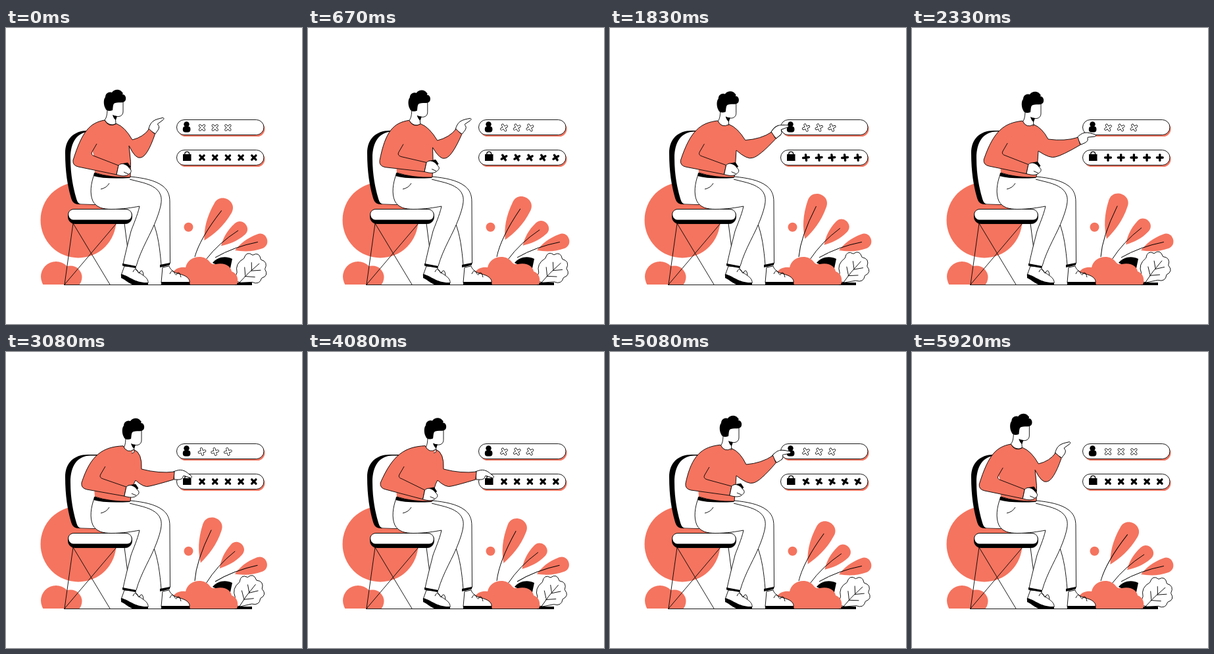
An HTML page with a canvas that plays this animation: 450 px wide and 450 px high, repeating every 6010 ms.

```html
<!DOCTYPE html>
<html lang="en">
<head>
<meta charset="utf-8">
<title>Login illustration</title>
<style>
html, body { margin: 0; width: 100%; height: 100%; overflow: hidden; background: #fff; }
canvas { display: block; width: 450px; height: 450px; }
</style>
</head>
<body>
<canvas id="stage" width="450" height="450"></canvas>
<script>
const ctx = document.getElementById('stage').getContext('2d');
const CORAL = '#f4745f', BLACK = '#000', WHITE = '#fff';
const LINE = 0.9;
const LOOP = 6010;
const TIMES = [0, 1330, 2330, 3080, 4080, 5080, LOOP];
const RAD = Math.PI / 180;

// One value per key time; the last key wraps to the first.
const KEYS = {
  headX: [0, 10, 18, 28, 28, 18],
  headY: [0, 2, 3, 7, 6.5, 3],
  elbowX: [102, 106, 107.5, 108, 110, 108],
  elbowY: [201, 202, 200, 199, 199, 200],
  palmX: [178, 184, 182, 182, 184.5, 184],
  palmY: [216, 216, 216, 218, 217, 217],
  cuffX: [222, 241, 254, 255.5, 255.5, 250],
  cuffY: [157.5, 158.5, 172, 188, 188, 163],
  wrist: [-48, -41, -18, 6, 6, -22],
  crookX: [192, 203, 207, 206, 206, 207],
  crookY: [170, 172, 169, 178, 178, 171],
  bendX: [209, 218, 222, 222, 222, 222],
  bendY: [200, 202, 199, 207, 207, 202],
  pitX: [187, 192, 192, 197, 197, 192],
  pitY: [179, 185, 187, 195, 195, 188],
  leafA: [-60, -69, -72, -72, -69, -62],
  leafB: [-42, -45, -47, -48, -46, -43.5],
  leafC: [-20, -20, -20, -21, -21, -20],
  shrub: [4, 0, -5, -6, -4, 2],
  spinA: [45, 78, 60, 76, 60, 60],
  spinB: [45, 72, 90, 45, 45, 32]
};

// Monotone cubic through the keys, periodic in time.
function sample(v, t) {
  const n = v.length;
  const span = i => TIMES[(i + n) % n + 1] - TIMES[(i + n) % n];
  const slope = i => (v[(i + 1 + n) % n] - v[(i + n) % n]) / span(i);
  const tangent = i => {
    const a = slope(i - 1), b = slope(i);
    return a * b <= 0 ? 0 : 2 * a * b / (a + b);
  };
  let i = 0;
  while (i < n - 1 && t >= TIMES[i + 1]) i++;
  const h = span(i), u = (t - TIMES[i]) / h, w = 1 - u;
  return v[i] * (1 + 2 * u) * w * w + v[(i + 1) % n] * u * u * (3 - 2 * u)
    + h * u * w * (tangent(i) * w - tangent(i + 1) * u);
}

function pose(t) {
  const p = {};
  for (const k in KEYS) p[k] = sample(KEYS[k], t);
  const swing = (1 - Math.cos(t / LOOP * 6 * Math.PI)) / 2;
  p.elbowX += 7 * swing;
  p.palmX += 8 * swing;
  p.palmY -= 6 * swing;
  return p;
}

function shape(d, fill, stroke = BLACK, width = LINE) {
  const path = new Path2D(d);
  if (fill) { ctx.fillStyle = fill; ctx.fill(path); }
  if (stroke) { ctx.strokeStyle = stroke; ctx.lineWidth = width; ctx.stroke(path); }
}

function disc(x, y, r, fill) {
  ctx.beginPath();
  ctx.arc(x, y, r, 0, 7);
  ctx.fillStyle = fill;
  ctx.fill();
}

function pill(x, y, w, h, r, fill, stroke) {
  ctx.beginPath();
  ctx.roundRect(x, y, w, h, r);
  ctx.fillStyle = fill;
  ctx.fill();
  if (stroke) { ctx.strokeStyle = stroke; ctx.lineWidth = LINE; ctx.stroke(); }
}

function at(x, y, degrees, draw) {
  ctx.save();
  ctx.translate(x, y);
  ctx.rotate(degrees * RAD);
  draw();
  ctx.restore();
}

function backdrop() {
  disc(110, 292, 57.5, CORAL);
  ctx.save();
  ctx.beginPath();
  ctx.rect(0, 340, 200, 50);
  ctx.clip();
  disc(76, 378, 23, CORAL);
  disc(98, 379, 17.5, CORAL);
  ctx.restore();
  disc(277.5, 302.8, 7, CORAL);
}

function chair() {
  shape('M102 297L89 390M168 297L89 390M102 297L158 390M180 297L192 390');
  shape('M127 156C104 155 90 168 90 190C90 220 94 240 98 255C100 263 102 267 109 268L140 269H150V156Z', BLACK, null);
  shape('M128 157.5C109 158 98 172 98 198C98 225 103 245 106 256C108 263 109 267 114 267.5L150 268.5V157.5Z', WHITE, null);
  pill(94.5, 275.5, 97, 22, 10, BLACK, BLACK);
  shape('M104 275.5H182C194 275.5 194 292 184 292H102C93 291 91 275.5 104 275.5Z', WHITE);
}

function leaf(x, y, angle, start, length, half) {
  at(x, y, angle, () => {
    const d = length - start, shoulder = length - half;
    shape(`M${start} 0C${start + d * 0.2} ${-half * 0.6} ${start + d * 0.45} ${-half} ${shoulder} ${-half}
      C${length + half * 0.3} ${-half} ${length + half * 0.3} ${half} ${shoulder} ${half}
      C${start + d * 0.45} ${half} ${start + d * 0.2} ${half * 0.5} ${start} 0Z`, CORAL, null);
    shape(`M0 0Q${start} ${-half * 0.5} ${length - half * 1.3} 0`);
  });
}

function shrub(tilt) {
  const nodes = [[357, 387], [350, 372], [359, 350], [372, 344], [385, 350], [392, 364], [388, 378], [374, 385]];
  at(355, 388, tilt, () => {
    ctx.translate(-355, -388);
    let d = 'M' + nodes[0];
    nodes.slice(1).forEach(([x, y], i) => {
      const mx = (x + nodes[i][0]) / 2, my = (y + nodes[i][1]) / 2;
      d += `Q${mx + (mx - 372) * 0.5} ${my + (my - 366) * 0.5} ${x} ${y}`;
    });
    shape(d + 'Z', WHITE);
    shape('M354 388Q366 372 383 356M363 376L361 363M372 367L371 355M362 377L378 377M371 368L386 366');
  });
}

function plants(p) {
  shape('M88 390.5H374');
  leaf(287, 348, p.leafA, 29, 101, 15);
  leaf(304, 352, p.leafB, 31, 81, 11.5);
  leaf(318, 349, p.leafC, 32, 84, 11.5);
  shape('M314 357C321 348 334 346 344 351L340 370Z', BLACK, null);
  shrub(p.shrub);
  shape('M348 387H374V391H348Z', BLACK, null);
  shape('M238 390C237 378 245 371 254 372C258 364 267 363 273 364C277 346 301 343 310 356C313 360 316 359 319 359C334 356 342 363 343 370C352 373 354 383 351 390Z', CORAL, null);
}

function cross(x, y, angle, outlined) {
  at(x, y, angle, () => {
    ctx.lineCap = 'round';
    const bars = 'M-4.4 0H4.4M0 -4.4V4.4';
    shape(bars, null, BLACK, outlined ? 4 : 3.4);
    if (outlined) shape(bars, null, WHITE, 2.5);
    ctx.lineCap = 'butt';
  });
}

function fields(p) {
  for (const y of [139.5, 185.5]) {
    pill(261.5, y + 2.5, 132, 23, 11.5, CORAL);
    pill(259.5, y, 132.5, 23, 11.5, WHITE, BLACK);
  }
  disc(274.5, 146.5, 4.2, BLACK);
  pill(268.8, 149.5, 11.6, 9, 4, BLACK);
  shape('M269 191.8H281.5V202H269Z', BLACK, null);
  shape('M271.8 193V191.5A3.4 3.4 0 0 1 278.6 191.5V193', null, BLACK, 1.3);
  for (let i = 0; i < 5; i++) {
    const x = 298 + i * 19.7;
    if (i < 3) cross(x, 151.5, p.spinA, true);
    cross(x, 197, p.spinB, false);
  }
}

function legs() {
  // far leg
  shape('M180 226L190 226C208 228 226 231 238 240C246 246 249 254 249 264L249.5 358L236 361C234 335 231 314 224 296L205 262Z', WHITE);
  shape('M238 364L236 387H279C280 380 272 376 264 374C256 372 250 368 248 362Z', WHITE);
  shape('M234 360L249 357V360.5L234 364Z', BLACK, null);
  shape('M236 386H279L280 391H236Z', BLACK, null);
  shape('M249 374Q252 366 256 372Q259 378 260 373Q264 369 266 379');
  // near leg
  const shin = 'C200 285 193 300 190 309C186 325 182 340 178 359';
  const calf = 'M198 362C205 336 221 312 229 290C235 274 238 262 235 254C231 242 216 237 204 234L188 230';
  const hip = 'M134 223C129 236 127 252 132 263C137 273 148 275.5 160 275.5C178 275.5 192 273 203 271';
  shape(`${hip}${shin}${calf.replace('M', 'L')}L188 226Z`, WHITE, null);
  shape(hip + shin + calf);
  shape('M180 362L175 376C188 379 198 390 216 388C217 381 210 377 204 373C198 369 197 367 197 363Z', WHITE);
  shape('M175 374C188 377 196 388 216 387V391H196C188 390 182 383 175 380Z', BLACK, null);
  shape('M177 358L198 362L197 365L177 361.5Z', BLACK, null);
  shape('M193 371Q196 363 200 369Q202 376 204 370Q208 366 209 376');
  shape('M144 245Q153 243 157 236');
  shape('M134 220Q155 227 188 226V228Q150 230 133 225Z', BLACK, null);
}

function head(p) {
  at(p.headX, p.headY, 0, () => {
    shape('M154 122C154 131 153 136 150 140C154 147 163 149 167 145L166 134C173 136 178 133 178 127V110H158Z', WHITE);
    shape('M162 132Q166 134 169 134L167 140Q163 137 162 132Z', BLACK, null);
    shape('M151 122C148 117 148 108 151 105C151 99 157 96 161 98C165 92 174 93 176 97C178 98 178 100 177 101C183 101 183 109 181 111C177 115 171 112 166 114C162 115 163 121 162 125C157 127 152 126 151 122Z', BLACK, null);
  });
}

function rightHand(p) {
  at(p.cuffX, p.cuffY, p.wrist, () => {
    shape('M-1.5 -6C4 -9 8 -10 12 -9.5C17 -9 22 -5 26.5 -2C28 0 26 1 24 .5L14.5 -1.5C13 0 14 2 12 3.5C9 6 5 5 1 6Z', WHITE);
  });
}

function torso(p) {
  const { headX: dx, elbowX: ex, elbowY: ey } = p;
  const neckL = [150 + dx, 140 + p.headY * 0.4];
  const neckR = [168 + dx * 0.94, 145.5 + p.headY * 0.4];
  const shoulder = `C${128 + dx * 0.7} 144 ${116 + dx * 0.45} 156 ${ex} ${ey}`;
  const collar = `Q${156 + dx} ${neckL[1] + 12} ${neckR}`;
  const side = `M135 220Q160 228 189 227Q191 204 ${p.pitX} ${p.pitY}`;

  shape(`${side}L${p.crookX - 4} ${p.crookY}L${neckR}L${neckL}C${128 + dx * 0.7} 144 ${126 + dx * 0.5} 170 133 192Z`, CORAL, null);
  shape(side);

  rightHand(p);
  const a = p.wrist * RAD, sx = 6 * Math.sin(a), sy = 6 * Math.cos(a);
  shape(`M${neckR}Q${neckR[0] + 13} ${neckR[1] + 5} ${p.crookX} ${p.crookY}
    Q${(p.crookX + p.cuffX) / 2 + 2} ${(p.crookY + p.cuffY) / 2 + 2} ${p.cuffX + sx} ${p.cuffY - sy}
    L${p.cuffX - sx} ${p.cuffY + sy}Q${p.bendX + 6} ${p.bendY - 5} ${p.bendX - 4} ${p.bendY - 3}
    Q${p.bendX - 12} ${p.bendY} ${p.pitX} ${p.pitY}`, CORAL);

  head(p);
  shape(`M${neckL}${collar}L${neckR[0] - 6} ${neckR[1] + 10}L${neckL[0] - 5} ${neckL[1] + 10}Z`, CORAL, null);
  shape(`M${neckL}${collar}`);

  const cx = p.palmX - 10, cy = p.palmY;
  const innerX = ex + 28, innerY = ey - 8;
  const sleeve = `M${neckL}${shoulder}Q${ex - 1} ${ey + 8} ${ex + 8} ${ey + 10}L${cx} ${cy + 7}L${cx + 3} ${cy - 7}
    L${innerX + 5} ${innerY + 2}Q${innerX - 2} ${innerY} ${innerX + 1} ${innerY - 5}L${innerX + 8} ${innerY - 17}`;
  shape(sleeve, CORAL);
}

function leftHand(p) {
  at(p.palmX, p.palmY, 0, () => {
    shape('M-4 -9L7 -11L11 -5L8 -2Z', BLACK);
    shape('M-10 7L-7 -7C-3 -11 2 -10 7 -6L12 0C13 5 9 5 8 7C3 10 -3 9 -10 7Z', WHITE);
    shape('M8 6L1 3');
  });
}

function render() {
  const p = pose(performance.now() % LOOP);
  ctx.fillStyle = WHITE;
  ctx.fillRect(0, 0, 450, 450);
  ctx.lineJoin = 'round';
  backdrop();
  chair();
  plants(p);
  fields(p);
  legs();
  torso(p);
  leftHand(p);
  requestAnimationFrame(render);
}
render();
</script>
</body>
</html>
```
